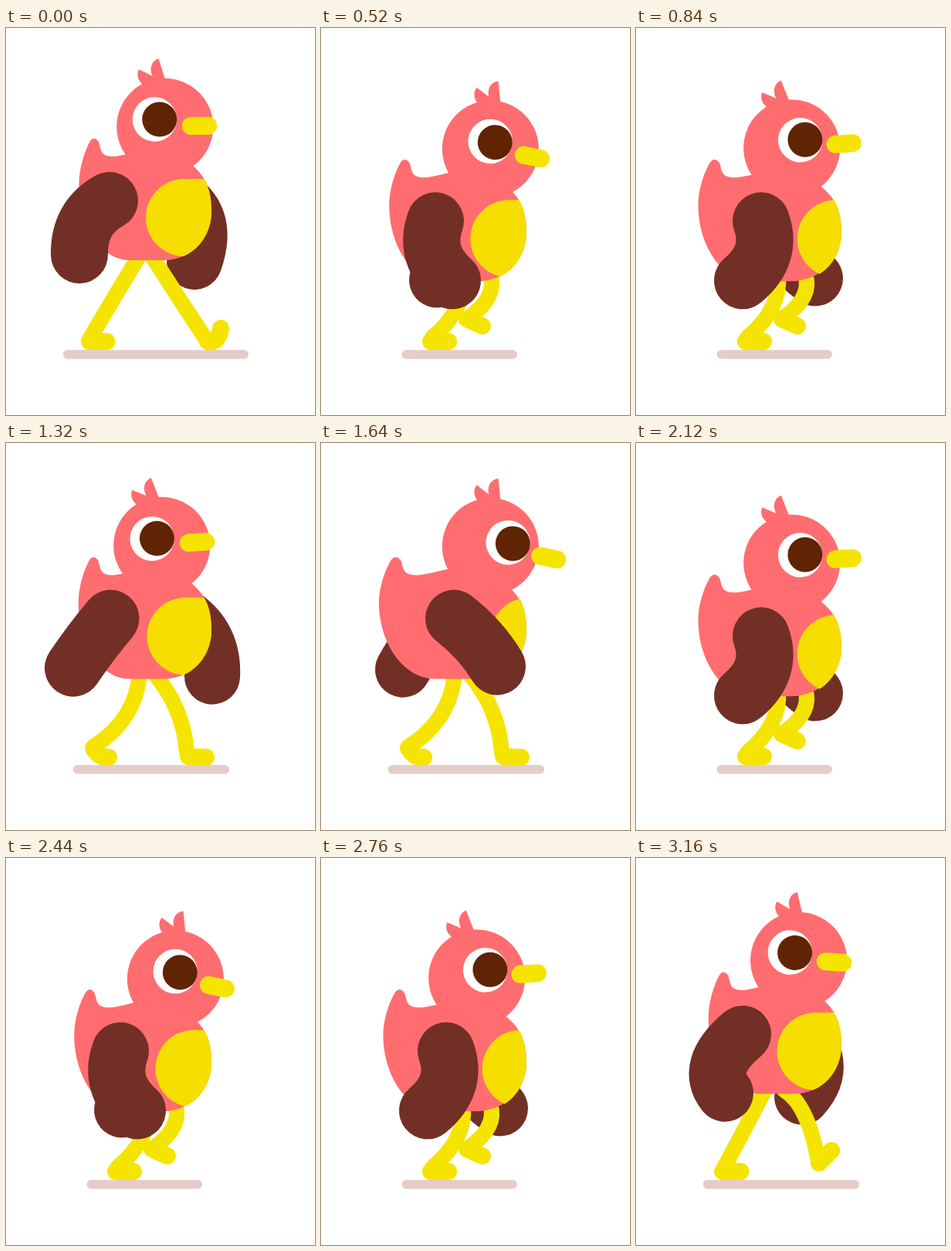
An HTML page without scripts for the animation above (3200 ms loop, 400 by 500 pixels).

```html
<!DOCTYPE html>
<html lang="en">
<head>
<meta charset="utf-8">
<title>Walking bird</title>
<style>
@property --t { syntax: "<number>"; inherits: true; initial-value: 0; }

html, body { margin: 0; width: 100%; height: 100%; overflow: hidden; background: #fff; }

/* One walk cycle: 16 held poses in 640 ms */
svg {
  display: block; width: 100vw; height: 100vh;
  --s: sin(var(--t) * 22.5deg);
  --c: cos(var(--t) * 22.5deg);
  --turn: (1 - var(--c));
  animation: tick 640ms steps(16) -2ms infinite;
}
@keyframes tick { to { --t: 16; } }

.pink { fill: #ff6d70; }
.limb { fill: none; stroke-linecap: round; stroke-linejoin: round; animation: 640ms steps(2) -2ms infinite; }
.leg, .foot, .beak { stroke: #f5e400; }
.leg { stroke-width: 20; animation-name: leg; }
.foot { stroke-width: 22; animation-name: foot; }
.other { animation-delay: -322ms; }
.wing { stroke: #722f25; stroke-width: 74; animation-name: near; }
.far { stroke-width: 72; animation-name: far; }
.beak { stroke-width: 23; stroke-linecap: round; transform: translateX(calc(16.6px * var(--turn))); }
.eye { transform: translateX(calc(18px * var(--turn))); }

.floor {
  --a: max(var(--s), -1 * var(--s));
  fill: #e6ccc9;
  x: calc(74px + 33px * var(--a));
  width: calc(240px - 98px * var(--a));
}
.bob { transform: translateY(calc(32px * var(--s) * var(--s))); }
.body { transform-origin: 266px 0; transform: scaleX(calc(1 + .059 * var(--turn))); }
.belly { fill: #f6de00; transform: translateX(calc(20px * var(--turn))); }
.head {
  transform-origin: 206px 193px;
  transform: rotate(calc(4deg - 11deg * cos(var(--t) * 22.5deg - 67.5deg)));
}

@keyframes leg {
  0%, 100% { d: path("M189,295Q224,350 260,404"); animation-timing-function: steps(1); }
  6.25% { d: path("M192,298Q230,343 234,400"); }
  18.75% { d: path("M190,320Q216,360 191,399"); }
  31.25% { d: path("M184,320Q188,363 144,400"); }
  43.75% { d: path("M168,298Q141,350 113,402"); animation-timing-function: steps(1); }
  50% { d: path("M172,295Q140,348 108,402"); animation-timing-function: steps(1); }
  56.25% { d: path("M173,298Q168,357 114,392"); }
  68.75% { d: path("M195,318Q190,360 138,369"); }
  81.25% { d: path("M219,318Q229,348 190,375"); }
  93.75% { d: path("M192,300Q222,318 236,391"); animation-timing-function: steps(1); }
}
@keyframes foot {
  0%, 100% { d: path("M261,405Q275,408 278,388"); animation-timing-function: steps(1); }
  6.25% { d: path("M236,405Q248,406 259,406"); }
  18.75% { d: path("M190,405Q202,405 213,405"); }
  31.25% { d: path("M142,405Q154,405 165,405"); }
  43.75% { d: path("M112,405Q124,405 135.5,405"); animation-timing-function: steps(1); }
  50% { d: path("M108,405Q120,405 130.5,405"); animation-timing-function: steps(1); }
  56.25% { d: path("M113,394Q120,407 133,406"); }
  68.75% { d: path("M132,370Q134,381 142,391"); }
  81.25% { d: path("M189,376Q199,381 209,385"); }
  93.75% { d: path("M237,394Q245,386 253,378"); animation-timing-function: steps(1); }
}
@keyframes near {
  0%, 100% { d: path("M134,223Q94,245 95,293"); animation-timing-function: steps(1); }
  6.25% { d: path("M135.5,222Q110,252 87,286"); }
  18.75% { d: path("M146,222Q141,267 102,289"); }
  31.25% { d: path("M162,222Q178,266 138,299"); }
  43.75% { d: path("M172,222Q214,250 198,298"); animation-timing-function: steps(1); }
  50% { d: path("M173,222Q213,247 216,291"); animation-timing-function: steps(1); }
  56.25% { d: path("M172,222Q206,248 228,284"); }
  68.75% { d: path("M161,222Q174,262 218,284"); }
  81.25% { d: path("M148,222Q132,266 170,299"); }
  93.75% { d: path("M138,223Q88,265 115,299"); animation-timing-function: steps(1); }
}
@keyframes far {
  0%, 100% { d: path("M215,215Q266,240 244,302"); animation-timing-function: steps(1); }
  6.25% { d: path("M218,212Q270,239 267,297"); }
  18.75% { d: path("M212,217Q240,265 268,295"); }
  31.25% { d: path("M200,217Q185,265 232,296"); }
  43.75% { d: path("M178,217Q140,262 162,300"); animation-timing-function: steps(1); }
  50% { d: path("M168,217Q128,245 130,294"); animation-timing-function: steps(1); }
  56.25% { d: path("M165,217Q130,245 106,288"); }
  68.75% { d: path("M172,217Q165,262 106,290"); }
  81.25% { d: path("M188,217Q215,262 150,298"); }
  93.75% { d: path("M205,215Q255,260 215,304"); animation-timing-function: steps(1); }
}
</style>
</head>
<body>
<svg viewBox="0 0 400 500">
  <defs>
    <path id="torso" d="M242,178C263,196 266,217 266,238C266,268 244,300 204,300H160C122,300 94,252 94.500,200C95,180 102,158 109,146Q114,139 120,147C122,153 122,161 128,164C136,168 146,165 156,163L205,150Z"/>
    <clipPath id="chest"><use href="#torso"/></clipPath>
  </defs>

  <rect class="floor" y="416" height="11.500" rx="5.750"/>

  <g class="bob"><path class="limb wing far"/></g>

  <path class="limb leg other"/>
  <path class="limb foot other"/>
  <path class="limb leg"/>
  <path class="limb foot"/>

  <g class="bob">
    <use class="pink body" href="#torso"/>
    <g clip-path="url(#chest)">
      <path class="belly" d="M300,195H231A50,50 0 0 0 231,295H300Z"/>
    </g>
    <g class="head">
      <path class="pink" d="M207,68L198,39.500C188,43 186,53 190,62L172.500,53.500C169,60 171,69 180,75Z"/>
      <circle class="pink" cx="206" cy="127.500" r="62.500"/>
      <g class="eye">
        <circle cx="192.700" cy="118" r="28.700" fill="#fff"/>
        <circle cx="199" cy="118" r="22.500" fill="#602404"/>
      </g>
      <path class="beak" d="M239.500,126.500H262"/>
    </g>
    <path class="limb wing"/>
  </g>
</svg>
</body>
</html>
```
